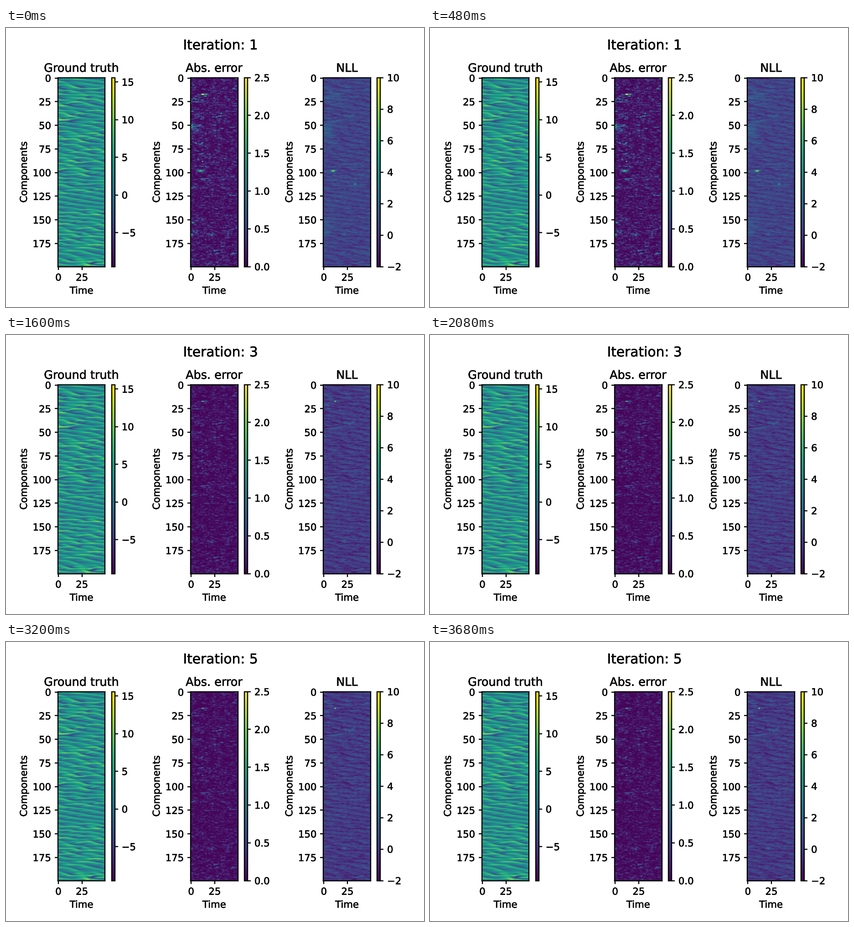
Write a matplotlib script that moves like this. It is 917 px wide and 611 px high and loops after 4 s.

```python
import numpy as np
import matplotlib.pyplot as plt
from matplotlib.animation import FuncAnimation
from matplotlib.patheffects import withStroke
from matplotlib.text import Text

W, H, DPI = 917, 611, 128
S = 152.8 / DPI  # keeps point sizes as on a 6 x 4 inch page
PX = 72 / DPI
ROWS, STEPS = 200, 50
LINE = 2.4 * PX

plt.rcParams.update({
    "font.family": "DejaVu Sans",
    "font.size": 10 * S,
    "axes.titlesize": 12 * S,
    "axes.titlepad": 6 * S,
    "axes.labelpad": 4 * S,
    "axes.linewidth": LINE,
})
for tick in ("xtick", "ytick"):
    plt.rcParams.update({
        f"{tick}.major.size": 3.5 * S,
        f"{tick}.major.width": LINE,
        f"{tick}.major.pad": 3.5 * S,
    })

rng = np.random.default_rng(7)
row, step = np.mgrid[:ROWS, :STEPS]


def slope(x):
    """Lorenz-96 tendency, with crests that travel to higher rows."""
    return (np.roll(x, 1) - np.roll(x, -2)) * np.roll(x, -1) - x + 8


def rk4(x, h=0.025):
    a = slope(x)
    b = slope(x + h / 2 * a)
    c = slope(x + h / 2 * b)
    d = slope(x + h * c)
    return x + h / 6 * (a + 2 * b + 2 * c + d)


def wave_field(spin_up=300):
    x = 8 + rng.normal(size=ROWS)
    states = []
    for _ in range(spin_up + STEPS):
        x = rk4(rk4(x))
        states.append(x)
    return np.array(states[spin_up:]).T


def streaks(n):
    """Unit noise, correlated over n steps in time."""
    noise = rng.normal(size=(ROWS, STEPS + n - 1))
    return sum(noise[:, i:i + STEPS] for i in range(n)) / np.sqrt(n)


def bump(r, t, height, width):
    return np.exp(-((row - r) / height) ** 2 - ((step - t) / width) ** 2)


def settle(a, share, amount, rows=ROWS, steps=STEPS):
    """Scale a random share of the cells in the top left region."""
    hit = (rng.random(a.shape) < share) & (row < rows) & (step < steps)
    return np.where(hit, a * amount, a)


waves = wave_field()
wave = (waves - waves.mean()) / waves.std()
truth = 3 + 3.3 * wave

# The first pass is worst near the start of a few bands and at two hot spots.
bands = bump(57, 4, 12, 7) + bump(20, 14, 6, 10) + bump(157, 3, 9, 7)
start = bump(51, 0, 2.5, 2.5) + bump(166, 0, 1, 2)
hot = bump(98, 10, 1, 3)
warm = bump(112, 33, 0.6, 1.5)

late = 0.14 * np.abs(streaks(3)) * np.exp(0.6 * streaks(5)) + 0.5 * start
early = 1.4 * late * (1 + 0.8 * bands) + 0.5 * start + 2 * hot + 0.8 * warm

grain = 0.35 * streaks(3) - 0.5 * wave
nll_late = grain + 1.6 * late ** 2
nll_early = (0.35 + 0.85 * grain + 0.8 * bands + 0.8 * np.minimum(early, 1) ** 2
             + 8 * hot ** 2 + 5 * warm)

errors = [early, late, settle(late, 0.25, 0.8)]
errors.append(settle(errors[-1], 0.03, 0.9, rows=165))
errors.append(errors[-1])

scores = [nll_early, nll_late, settle(nll_late, 0.25, 0.8, steps=46)]
scores.append(settle(scores[-1], 0.03, 0.9, rows=165, steps=44))
scores.append(settle(scores[-1], 0.2, 0.9, rows=20, steps=1))

fig = plt.figure(figsize=(W / DPI, H / DPI), dpi=DPI, facecolor="white")


def pixel_axes(x, width, top=108.7, height=413.9):
    return fig.add_axes([x / W, 1 - (top + height) / H, width / W, height / H])


def panel(column, title, data, low, high, ticks):
    x = 113.9 + 291.2 * column
    ax = pixel_axes(x, 103.4)
    im = ax.imshow(data, cmap="viridis", vmin=low, vmax=high, aspect="auto")
    ax.set_title(title)
    ax.set_xlabel("Time")
    ax.set_ylabel("Components")
    ax.set_xticks([0, 25])
    ax.set_yticks(range(0, ROWS, 25))
    fig.colorbar(im, cax=pixel_axes(x + 118, 6.9), ticks=ticks)
    return im


panel(0, "Ground truth", truth, -9.52, 15.58, range(-5, 16, 5))
error_im = panel(1, "Abs. error", early, 0, 2.5, np.arange(0, 2.6, 0.5))
score_im = panel(2, "NLL", nll_early, -2, 10, range(-2, 11, 2))
heading = fig.text(470.7 / W, 1 - 47 / H, "", fontsize=14 * S,
                   ha="center", va="baseline")

# A hairline outline gives the lettering its heavier weight.
fig.canvas.draw()
for text in fig.findobj(Text):
    text.set_path_effects([withStroke(linewidth=0.6 * PX, foreground="black")])


def update(i):
    heading.set_text(f"Iteration: {i + 1}")
    error_im.set_data(errors[i])
    score_im.set_data(scores[i])
    return heading, error_im, score_im


anim = FuncAnimation(fig, update, frames=5, interval=800, repeat=True,
                     repeat_delay=0, blit=False)
plt.show()
```
